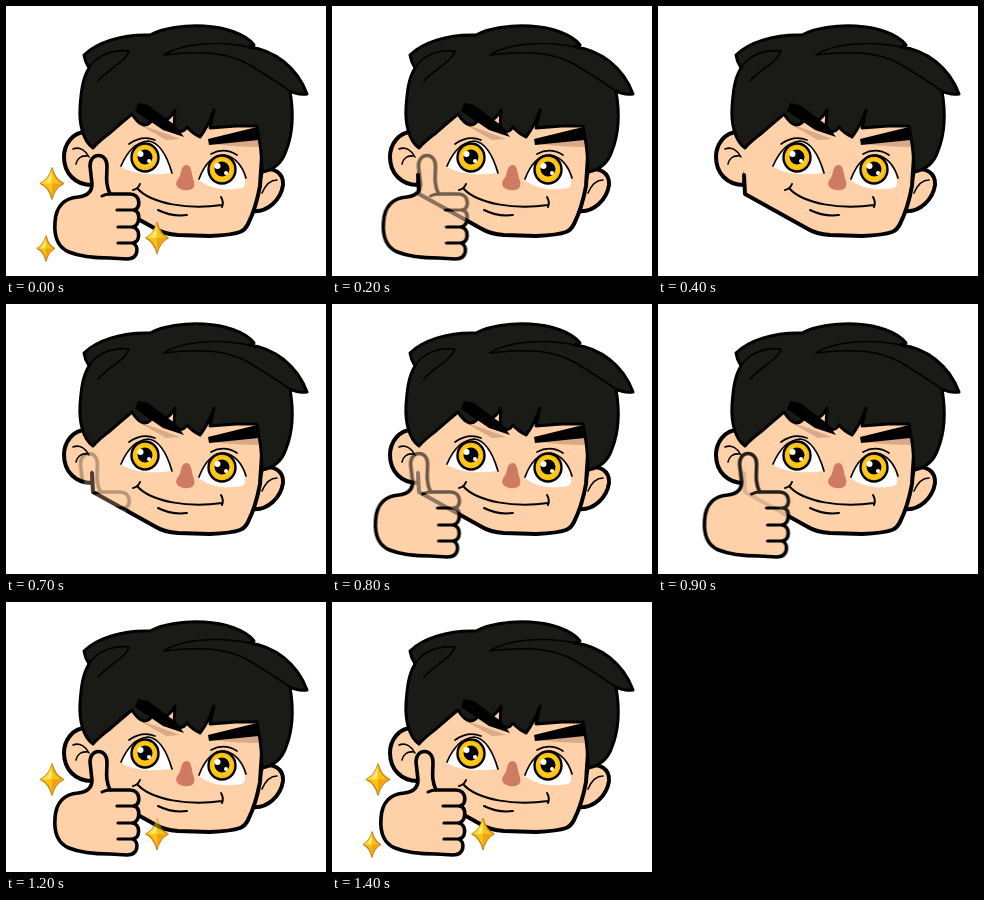
Write an HTML page with a canvas that moves like this. It is 320x270 px and loops after 2000 ms.

```html
<!DOCTYPE html>
<html lang="en">
<head>
<meta charset="utf-8">
<title>Thumbs up</title>
<style>
html, body { margin: 0; width: 100%; height: 100%; overflow: hidden; background: #fff; }
canvas { display: block; width: 320px; height: 270px; }
</style>
</head>
<body>
<canvas id="stage" width="320" height="270"></canvas>
<script>
const W = 320, H = 270, LOOP = 2000, STEP = 100;
const INK = '#000', SKIN = '#ffd1a9', HAIR = '#1a1b16';
const ctx = document.getElementById('stage').getContext('2d');

function sprite(draw) {
  const c = document.createElement('canvas');
  c.width = W;
  c.height = H;
  const g = c.getContext('2d');
  g.lineJoin = g.lineCap = 'round';
  draw((d, fill, stroke, width = 2) => {
    const path = new Path2D(d);
    if (fill) { g.fillStyle = fill; g.fill(path); }
    if (stroke) { g.strokeStyle = stroke; g.lineWidth = width; g.stroke(path); }
  });
  return c;
}

const disc = (x, y, r, ry = r) =>
  `M${x - r} ${y}a${r} ${ry} 0 1 0 ${2 * r} 0a${r} ${ry} 0 1 0 ${-2 * r} 0z`;

function iris(p, x, y) {
  p(disc(x, y, 13.5, 14), '#fdbd12', INK, 2.4);
  p(disc(x, y, 10.5, 11), '#ffc916');
  p(disc(x, y - .5, 7.5), INK);
  p(disc(x - 4.5, y - 3.5, 3), '#fff');
  p(disc(x + 4, y + 3.5, 2), '#fff');
}

const head = sprite(p => {
  // ears
  p('M80 126C67 126 58 138 58 151C58 167 69 179 86 179L92 135z', SKIN, INK, 4);
  p('M256 165C267 160 278 167 277 179C275 193 262 207 246 205z', SKIN, INK, 4);
  p('M271 174C264 174 259 180 256 187', null, INK, 1.6);
  // face, open towards the left ear
  const jaw = 'M86 169L87 188L150 223Q158 228 172 229L204 230Q226 229 234 226Q239 224 242 218Q250 202 254 180L258 120';
  p(jaw + 'L200 90L86 120z', SKIN);
  p(jaw, null, INK, 4);
  p('M67 143C74 140 80 145 83 151M81 150C75 149 71 153 70 158', null, INK, 1.6);
  // eyes
  p('M115 161C121 147 130 137 142 136C153 137 161 151 165 167C146 170 128 168 115 161z', '#fff');
  p('M193 174C199 158 208 150 217 150C229 151 237 162 239 175Q240 180 236 182C220 185 204 183 193 174z', '#fff');
  iris(p, 139, 151.5);
  iris(p, 216, 163.5);
  p('M115 160C121 146 130 136 142 135C153 136 161 150 166 167M123 138Q136 129 149 134', null, INK, 1.7);
  p('M193 173C199 157 208 149 218 149C229 150 237 161 240 172M205 148Q218 141 231 149', null, INK, 1.7);
  // nose and mouth
  p('M180 159C186 158 185 168 188 175C190 183 184 185 178 184C171 183 168 178 172 173C176 169 174 160 180 159z', '#cf7a63');
  p('M131 182C145 198 183 204 216 199M127 184Q132 183 134 178M215 191Q218 196 216 201M152 204Q166 211 181 209', null, INK, 2);
  // brow shadows
  p('M132 118L150 124L174 133L160 134z', '#d8aa87');
  p('M206 138L253 134L252 141Q230 141 206 138z', '#d8aa87');
  // hair
  p('M78 49C90 37 115 28 144 29C157 22 178 19 198 20C218 21 240 28 248 39L243 41'
    + 'C268 44 291 61 301 88Q291 89 284 85C288 108 286 130 280 145C276 157 267 164 256 166'
    + 'Q256 145 251 120L230 120L204 122L208 104Q203 119 194 131Q186 127 181 121Q175 130 168 121L169 104'
    + 'Q165 112 157 116L146 112Q145 119 138 119Q132 118 126 108Q114 118 104 127Q93 135 87 142'
    + 'C77 135 73 118 74 101C75 88 76 73 83 62Q79 56 78 49z', HAIR, INK, 3);
  p('M83 62C90 50 106 43 123 45C119 57 103 62 92 75M158 49C174 38 211 34 243 41M158 49C198 44 222 47 242 58Q262 70 284 85', null, INK, 1.6);
  // brows
  p('M132 97L142 99L170 120L178 131L157 124L129 105z', INK);
  p('M202 133L251 121L253 134L203 139z', INK);
});

const hand = sprite(p => {
  p('M84 160C84 146 101 146 101 160C101 170 99 177 104 188L124 188C135 188 135 203 128 204'
    + 'C135 206 134 219 127 221C135 223 134 236 127 237C133 240 133 253 121 253L104 252'
    + 'C88 252 75 251 63 246C51 241 48 229 49 216C50 200 59 192 72 191C82 190 86 185 86 178z', SKIN, INK, 3.6);
  p('M111 204L128 204M112 221L127 221M112 237L127 237', null, INK, 3.2);
  p('M104 188Q100 188 96 190', null, INK, 3);
});

const star = (x, y, rx, ry) => sprite(p => {
  const tip = (sx, sy) => `Q${x + sx * rx * .25} ${y + sy * ry * .25} `;
  const body = `M${x} ${y - ry}${tip(1, -1)}${x + rx} ${y}${tip(1, 1)}${x} ${y + ry}`
    + `${tip(-1, 1)}${x - rx} ${y}${tip(-1, -1)}${x} ${y - ry}z`;
  p(body, '#fdc313', '#c98c1c', 1.5);
  p(`M${x} ${y}L${x + rx} ${y}${tip(1, 1)}${x} ${y + ry}z`, '#f0a315');
  p(`M${x} ${y - ry}${tip(-1, -1)}${x - rx} ${y}L${x} ${y}z`, '#ffdc43');
  p(`M${x - rx * .35} ${y - 1}L${x - 1} ${y - ry * .4}`, null, '#fff4b8', 1.3);
});

// in order of appearance
const stars = [star(46, 177.5, 11.5, 15.5), star(151, 232, 11, 15.5), star(40, 242.5, 8.5, 12.5)];

const clamp = v => Math.max(0, Math.min(1, v));

// Blends over what is already drawn; elsewhere it is either solid or absent.
function layer(image, x, alpha) {
  if (!alpha) return;
  ctx.globalCompositeOperation = 'source-atop';
  ctx.globalAlpha = alpha;
  ctx.drawImage(image, x, 0);
  ctx.globalAlpha = 1;
  if (alpha >= .5) {
    ctx.globalCompositeOperation = 'destination-over';
    ctx.drawImage(image, x, 0);
  }
  ctx.globalCompositeOperation = 'source-over';
}

function render(t) {
  const leaving = t < 500;
  const p = clamp(leaving ? t / 400 : (t - 600) / 500);
  const x = leaving ? 10 * p * p : -15 * (1 - p) ** 2;
  const alpha = clamp(leaving ? 1.1 - p * 1.1 : (t - 600) / 350);
  ctx.clearRect(0, 0, W, H);
  ctx.drawImage(head, 0, 0);
  layer(hand, x, alpha);
  stars.forEach((image, i) =>
    layer(image, 0, clamp(leaving ? 1 - t / 200 : (t - 1000 - i * 100) / 200)));
}

const start = performance.now();
function tick() {
  const t = (performance.now() - start) % LOOP;
  render(Math.floor(t / STEP) * STEP);
  requestAnimationFrame(tick);
}
tick();
</script>
</body>
</html>
```
